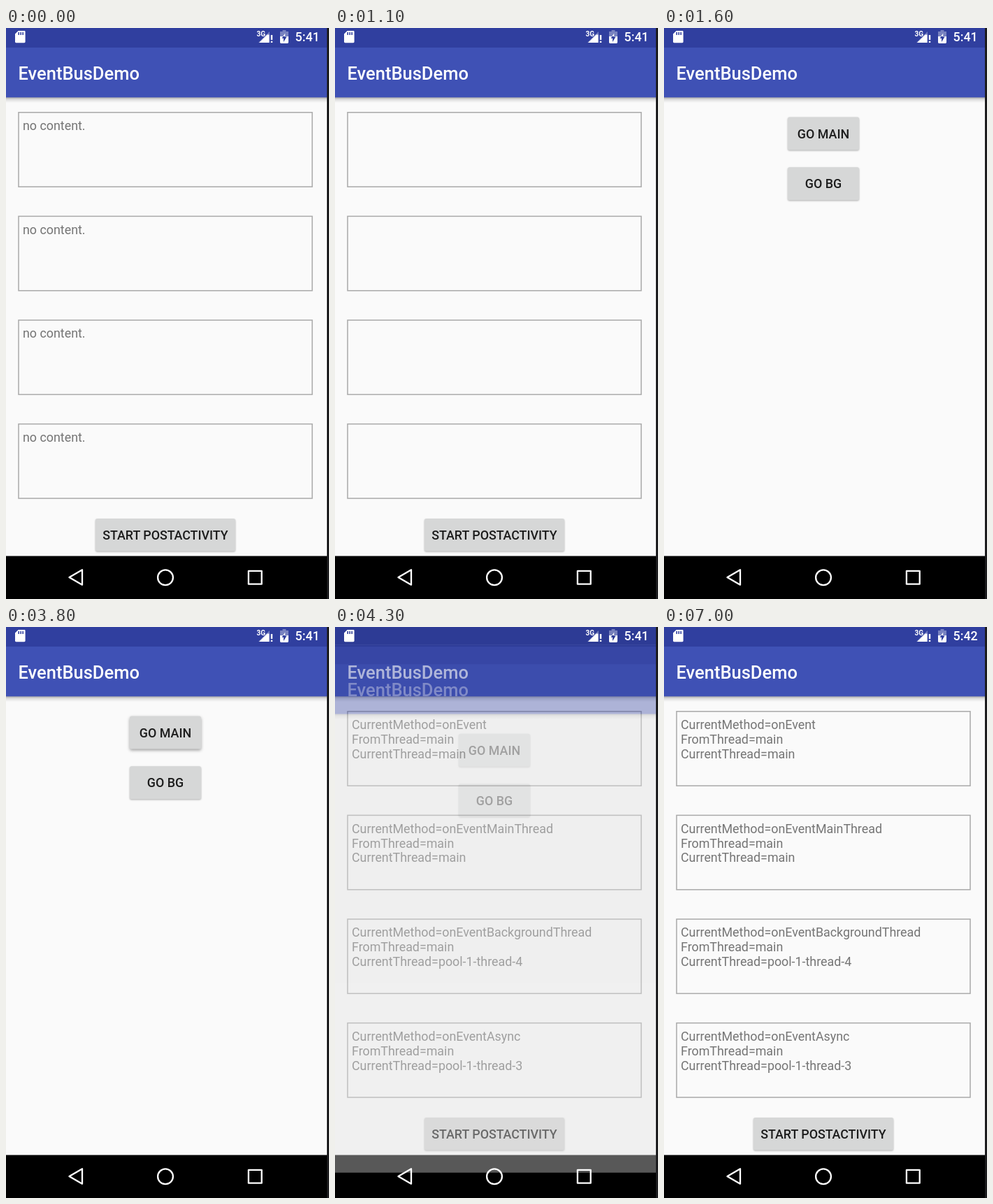
Write an HTML page that moves like this. It is 462 px wide and 817 px high and loops after 8000 ms.

```html
<!DOCTYPE html>
<html lang="en">
<head>
<meta charset="utf-8">
<title>EventBusDemo</title>
<style>
  html, body { margin: 0; width: 100%; height: 100%; overflow: hidden; background: #000; }
  svg { display: block; width: 100%; height: 100%; }
  text { font-family: Roboto, "Noto Sans", sans-serif; font-size: 17.85px; white-space: pre; }
  .title { font-size: 25.5px; font-weight: 500; fill: #fff; }
  .box { fill: none; stroke: #a9a9a9; stroke-width: 1.5; }
  .msg { fill: #757575; }
  .label { font-weight: 500; fill: #1c1c1c; text-anchor: middle; }
  .nav { fill: none; stroke: #fff; stroke-width: 2.3; stroke-linejoin: round; }
</style>
</head>
<body>
<svg viewBox="0 0 462 817" preserveAspectRatio="none">
  <defs>
    <linearGradient id="shade" x1="0" y1="0" x2="0" y2="1">
      <stop offset="0" stop-color="#000" stop-opacity=".34"/>
      <stop offset=".4" stop-color="#000" stop-opacity=".12"/>
      <stop offset="1" stop-color="#000" stop-opacity="0"/>
    </linearGradient>
    <clipPath id="window"><rect width="459" height="817"/></clipPath>
  </defs>
  <rect width="462" height="817" fill="#000"/>
  <g clip-path="url(#window)">
    <g id="list"></g>
    <g id="post"></g>
  </g>
  <rect x="459" width="3" height="817" fill="#1c1c1e"/>

  <g id="status" fill="#fff">
    <path fill-rule="evenodd" d="M17.6 4H26.2Q27.6 4 27.6 5.4V19.8Q27.6 21.2 26.2 21.2H14.4Q13 21.2 13 19.8V8.6ZM17.4 6V10H19V6ZM20.4 6V10H22V6ZM23.4 6V10H25V6Z"/>
    <text x="358.5" y="11.5" style="font-size:10px;font-weight:700">3G</text>
    <path d="M377 5V21H361Z" opacity=".32"/>
    <path d="M376.5 9.5V21H362L373.5 9.5Z"/>
    <path d="M378.8 10H381.2V17H378.8ZM378.8 18.7H381.2V21H378.8Z"/>
    <path d="M395.6 3H400.4V5H404V12H392V5H395.6Z" opacity=".35"/>
    <path fill-rule="evenodd" d="M392 12H404V20.6Q404 22 402.6 22H393.4Q392 22 392 20.6ZM399.2 12V12.6H401.6L397 20V14.8H394.6L396.3 12Z"/>
    <path d="M399.2 7.5V12H396.3Z"/>
    <text id="clock" x="413.6" y="19.3" style="font-weight:500">5:41</text>
  </g>
  <g class="nav">
    <path d="M90.5 786L109 775.3V796.7Z"/>
    <circle cx="228" cy="786.3" r="10.9"/>
    <rect x="346.9" y="776.9" width="18.8" height="18.8"/>
  </g>
</svg>
<script>
const LOOP = 8000, STEP = 100, SLIDE = 65.4;
const $ = id => document.getElementById(id);
const clamp = v => Math.max(0, Math.min(1, v));

const frame = body => `
  <rect width="459" height="756" y="0" fill="#fafafa"/>
  <rect y="755.5" width="459" height="62" fill="#000"/>
  <rect y="99" width="459" height="8" fill="url(#shade)"/>
  <rect y="27" width="459" height="72.3" fill="#3f51b5"/>
  <rect width="459" height="28" fill="#303f9f"/>
  <text class="title" x="17.5" y="73.5">EventBusDemo</text>${body}`;

const button = (id, label, x, y, w, h) => `
  <clipPath id="${id}Clip"><rect x="${x}" y="${y}" width="${w}" height="${h}" rx="2.5"/></clipPath>
  <rect id="${id}" x="${x}" y="${y}" width="${w}" height="${h}" rx="2.5" fill="#d6d7d7"/>
  <g clip-path="url(#${id}Clip)"><circle id="${id}Ripple" cx="${x + w / 2}" cy="${y + h / 2}" r="0"/></g>
  <text class="label" x="228" y="${y + h / 2 + 6.5}">${label}</text>`;

const results = [
  ['onEvent', 'main'],
  ['onEventMainThread', 'main'],
  ['onEventBackgroundThread', 'pool-1-thread-4'],
  ['onEventAsync', 'pool-1-thread-3']
].map(([method, thread]) =>
  ['CurrentMethod=' + method, 'FromThread=main', 'CurrentThread=' + thread]);

const boxTop = i => 120.8 + i * 148.6;
const lines = (rows, i) => rows.map((row, n) =>
  `<text class="msg" x="24" y="${boxTop(i) + 25.2 + n * 20.9}">${row}</text>`).join('');

$('list').innerHTML = frame(
  results.map((_, i) => `<rect class="box" x="18" y="${boxTop(i)}" width="420" height="106.4"/>`).join('') +
  `<g id="empty">${results.map((_, i) => lines(['no content.'], i)).join('')}</g>` +
  `<g id="filled">${results.map(lines).join('')}</g>` +
  button('start', 'START POSTACTIVITY', 128, 702, 200, 46.5));

$('post').innerHTML = frame(
  button('goMain', 'GO MAIN', 177, 127.5, 102, 47) +
  button('goBg', 'GO BG', 177, 199.3, 102, 47));

const show = (id, on) => $(id).style.display = on ? '' : 'none';

// Raised shadow and ripple of a button touched at `from` for `span` ms.
function press(id, t, from, span) {
  const u = t - from, hold = span - 200;
  const fade = u < 0 ? 0 : 1 - clamp((u - hold) / 200);
  const lift = fade;
  $(id).style.filter =
    `drop-shadow(0 ${1 + lift * 1.2}px ${1.1 + lift * 1.2}px rgba(0,0,0,${0.3 + lift * 0.06}))`;
  const ripple = $(id + 'Ripple');
  ripple.setAttribute('r', u > 0 ? $(id).width.baseVal.value / 2 * 1.1 * clamp(u / 200) : 0);
  ripple.setAttribute('opacity', 0.12 * fade);
}

// Pose of the upper window, and the brightness of the one beneath it.
function transition(t) {
  if (t < 1400) return { alpha: 0, y: 0, under: 1 };
  if (t < 1600) {
    const e = t - 1400 + 115;
    return {
      alpha: 1 - (1 - clamp(e / 200)) ** 3,
      y: SLIDE * (1 - clamp(e / 350)) ** 5,
      under: 1 - 0.3 * clamp(e / 217)
    };
  }
  if (t < 4000) return { alpha: 1, y: 0, under: 1 };
  const e = 132 + 0.65 * (t - 4200);
  return {
    alpha: 1 - clamp((e - 100) / 150),
    y: SLIDE * clamp(e / 250) ** 4,
    under: 0.7 + 0.3 * clamp(e / 250)
  };
}

function draw(t) {
  const { alpha, y, under } = transition(t);
  $('post').setAttribute('opacity', alpha);
  $('post').setAttribute('transform', `translate(0 ${y})`);
  show('post', alpha > 0);
  $('list').setAttribute('opacity', under);
  show('empty', t < 800);
  show('filled', t >= 1600);
  press('start', t, 500, 600);
  press('goMain', t, 3800, 400);
  press('goBg', t, LOOP, 400);
  $('clock').textContent = t < 7000 ? '5:41' : '5:42';
}

// The screen refreshes in steps of 100 ms.
const origin = performance.now();
function tick() {
  const t = (performance.now() - origin) % LOOP;
  draw(Math.floor(t / STEP) * STEP);
  requestAnimationFrame(tick);
}
tick();
</script>
</body>
</html>
```
